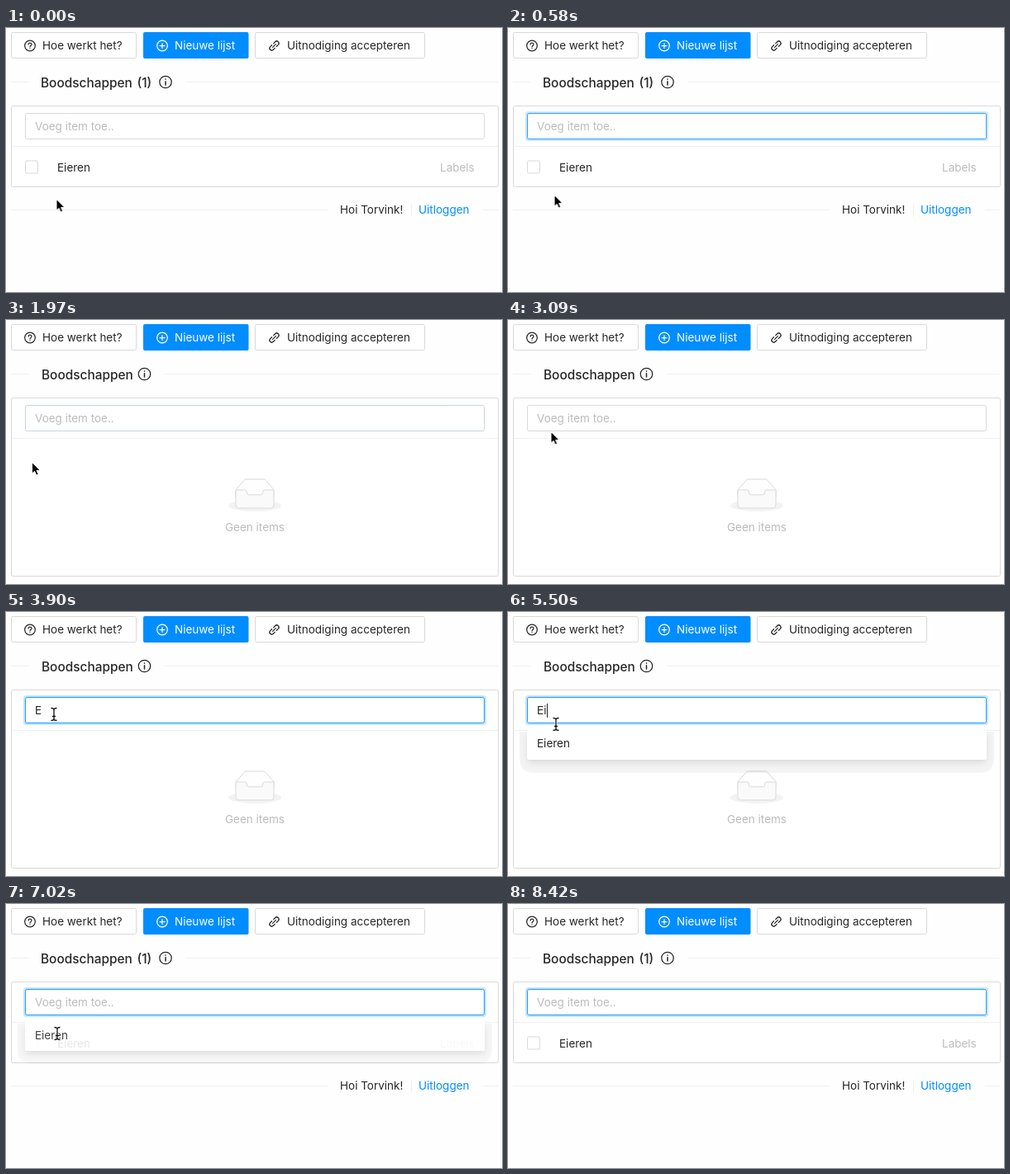
Animation of 600x320 px, one loop 9340 ms. Source, as an HTML page:

```html
<!DOCTYPE html>
<html lang="nl">
<head>
<meta charset="utf-8">
<title>Boodschappen</title>
<style>
html, body { margin: 0; width: 100%; height: 100%; overflow: hidden; background: #fefefe; }
svg { display: block; width: 600px; height: 320px; }
text { font: 13.5px Inter, "Open Sans", sans-serif; fill: #262626; }
.title { font-size: 15.4px; font-weight: 500; }
.muted { fill: #bcbcbc; }
.blue { fill: #008dff; }
.white { fill: #fff; }
.box { fill: #fff; stroke: #d9d9d9; }
.rule { fill: none; stroke: #f0f0f0; }
.icon { fill: none; stroke: #262626; stroke-width: 1.25; stroke-linecap: round; }
.icon.white { stroke: #fff; }

/* Hard switches, all on one 9340 ms loop */
.switch { animation: 9340ms step-end infinite; }
#list { animation-name: list; }
#empty { animation-name: empty; }
#hint { animation-name: hint; }
#typed { animation-name: typed; }
#second { animation-name: second; }
#caret { animation-name: caret; }
#hover, #hand { animation-name: hand; }
#arrow { animation-name: arrow; }
#beam { animation-name: beam; }
@keyframes list { 0%, 73.4% { visibility: visible } 19.27% { visibility: hidden } }
@keyframes empty { 0%, 73.4% { visibility: hidden } 19.27% { visibility: visible } }
@keyframes hint { 0%, 73.4% { visibility: visible } 41.11% { visibility: hidden } }
@keyframes typed { 0%, 73.4% { visibility: hidden } 41.11% { visibility: visible } }
@keyframes second { 0%, 73.4% { visibility: hidden } 46.25% { visibility: visible } }
@keyframes caret {
  0%, 53.85%, 65.74% { visibility: hidden }
  46.25%, 58.89% { visibility: visible }
}
@keyframes hand { 0%, 19.27% { visibility: hidden } 11.8% { visibility: visible } }
@keyframes arrow {
  0%, 19.27%, 60%, 84.1% { visibility: visible }
  11.8%, 33.5%, 73.77%, 90.15% { visibility: hidden }
}
@keyframes beam {
  0%, 60%, 84.1% { visibility: hidden }
  33.5%, 73.77% { visibility: visible }
}

#focus { animation: focus 9340ms ease-out infinite; }
@keyframes focus {
  0%, 3.75%, 21.73%, 35.33% { opacity: 0 }
  6.96%, 18.63%, 38.54%, 100% { opacity: 1 }
}

#menu { transform-origin: 23px 139px; animation: menu 9340ms linear infinite; }
@keyframes menu {
  0%, 46.25% { opacity: 0; transform: scaleY(.8); animation-timing-function: cubic-bezier(.23, 1, .32, 1) }
  48.5%, 73.77% { opacity: 1; transform: none; animation-timing-function: cubic-bezier(.755, .05, .855, .06) }
  75.91%, 100% { opacity: 0; transform: scaleY(.8) }
}

#pointer { animation: move 9340ms linear infinite; }
@keyframes move {
  0%, 1.17% { transform: translate(60.5px, 207px) }
  1.18%, 3.75% { transform: translate(60px, 207.5px); animation-timing-function: ease-in-out }
  12.96%, 14.12% { transform: translate(30px, 171px) }
  14.13%, 30.73% { transform: translate(31px, 172px) }
  33.08%, 33.7% { transform: translate(51.5px, 135px) }
  38%, 58.88% { transform: translate(58px, 124px) }
  58.89%, 59.5% { transform: translate(58px, 136px) }
  61.35%, 80.19% { transform: translate(62px, 157px) }
  80.84%, 83.4% { transform: translate(65px, 158px); animation-timing-function: ease-in }
  90.15%, 100% { transform: translate(487px, 324px) }
}
</style>
</head>
<body>
<svg viewBox="0 0 600 320">
  <defs>
    <filter id="blur" x="-10%" y="-60%" width="120%" height="220%"><feGaussianBlur stdDeviation="4"/></filter>
    <g id="info" class="icon">
      <circle r="7.2"/>
      <path d="M0-.8V3.6M0-3.6V-3.3" stroke-width="1.5"/>
    </g>
  </defs>

  <!-- Buttons -->
  <rect class="box" x="6.5" y="5.5" width="151" height="31" rx="2"/>
  <g class="icon" transform="translate(29 21.5)">
    <circle r="6.3"/>
    <path d="M-1.9-1.4C-1.9-4 1.9-4 1.9-1.5 1.9-.1 0 0 0 1.4M0 3.3V3.4"/>
  </g>
  <text x="44" y="26.3">Hoe werkt het?</text>
  <rect class="blue" x="166" y="5" width="127.5" height="32" rx="2"/>
  <g class="icon white" transform="translate(189 21.5)" style="fill: none">
    <circle r="6.3"/>
    <path d="M-3 0H3M0-3V3"/>
  </g>
  <text class="white" x="204" y="26.3">Nieuwe lijst</text>
  <rect class="box" x="301.5" y="5.5" width="205" height="31" rx="2"/>
  <g class="icon" transform="translate(324.5 21.5) rotate(-45)">
    <path d="M-1.5-2.6H-4.2A2.6 2.6 0 0 0-4.2 2.6H-1.5M1.5-2.6H4.2A2.6 2.6 0 0 1 4.2 2.6H1.5M-2.6 0H2.6"/>
  </g>
  <text x="340" y="26.3">Uitnodiging accepteren</text>

  <!-- List with one item -->
  <g id="list" class="switch">
    <path class="rule" d="M6 65.5H27M217 65.5H596M6 220.5H390M577 220.5H596M490.5 214V228"/>
    <text class="title" x="42" y="71.5">Boodschappen</text>
    <text class="title" x="158.5" y="71.5">(1)</text>
    <use href="#info" x="193" y="65.5"/>
    <rect class="box" x="6.5" y="94.5" width="589" height="98" rx="2"/>
    <rect class="box" x="23.5" y="161" width="15" height="15" rx="1.5"/>
    <text x="62" y="173.5">Eieren</text>
    <text class="muted" x="525" y="173.5">Labels</text>
    <text x="404" y="225.3">Hoi Torvink!</text>
    <text class="blue" x="499" y="225.3">Uitloggen</text>
  </g>
  <rect id="hover" class="switch" x="23.5" y="161" width="15" height="15" rx="1.5" fill="none" stroke="#1890ff"/>

  <!-- Empty list -->
  <g id="empty" class="switch">
    <path class="rule" d="M6 65.5H28M192 65.5H596"/>
    <text class="title" x="43" y="71.5">Boodschappen</text>
    <use href="#info" x="167.5" y="65.5"/>
    <rect class="box" x="6.5" y="94.5" width="589" height="216" rx="2"/>
    <g transform="translate(269 193)" stroke="#d9d9d9">
      <ellipse cx="32" cy="32" rx="32" ry="7" fill="#f3f3f3" stroke="none"/>
      <path fill="#fefefe" d="M55 12.8 44.9 1.3Q44 0 42.9 0H21.1Q20 0 19.1 1.3L9 12.8V22H55Z"/>
      <path fill="#fafafa" d="M41.6 16Q41.6 13 43.8 13H55V31Q55 35 52 35H12Q9 35 9 31V13H20.2Q22.4 13 22.4 16 22.4 18.9 24.6 18.9H39.4Q41.6 18.9 41.6 16Z"/>
    </g>
    <text class="muted" x="301" y="256.3" text-anchor="middle">Geen items</text>
  </g>

  <!-- Input -->
  <path class="rule" d="M7 143.5H595"/>
  <rect class="box" x="23.5" y="103.5" width="555" height="31" rx="2"/>
  <g id="focus" fill="none">
    <rect x="22" y="102" width="558" height="34" rx="3" stroke="#1890ff" stroke-opacity=".25" stroke-width="2"/>
    <rect x="23.5" y="103.5" width="555" height="31" rx="2" stroke="#1f9dff"/>
  </g>
  <text id="hint" class="switch muted" x="35" y="124.4">Voeg item toe..</text>
  <text id="typed" class="switch" x="35" y="124.4">E<tspan id="second" class="switch">i</tspan></text>
  <path id="caret" class="switch" d="M47.5 111V128" stroke="#262626"/>

  <!-- Suggestions -->
  <g id="menu">
    <path d="M14 145H588V177Q588 195 570 195H32Q14 195 14 177Z" fill-opacity=".045"/>
    <rect x="24" y="148" width="554" height="34" fill-opacity=".12" filter="url(#blur)"/>
    <rect x="23" y="139" width="556" height="40" rx="2" fill="#fff"/>
    <text x="35" y="164.4">Eieren</text>
  </g>

  <!-- Pointer -->
  <g id="pointer" stroke-linejoin="round">
    <path id="arrow" class="switch" d="M.5 .5V14.2L3.6 11.3 5.7 16.2 8.2 15.1 6.1 10.4H10.4Z" stroke="#fff"/>
    <g id="beam" class="switch" fill="none">
      <path d="M-3.5-7.5Q0-7.5 0-5.5 0-7.5 3.5-7.5M0-6V6M-3.5 7.5Q0 7.5 0 5.5 0 7.5 3.5 7.5M-2 2.5H2" stroke="#fff" stroke-width="3"/>
      <path d="M-3.5-7.5Q0-7.5 0-5.5 0-7.5 3.5-7.5M0-6V6M-3.5 7.5Q0 7.5 0 5.5 0 7.5 3.5 7.5M-2 2.5H2" stroke="#111" stroke-width="1.3"/>
    </g>
    <g id="hand" class="switch" stroke="#111" stroke-width="1.2">
      <path fill="#fff" d="M-1.6 9.5V.9Q-1.6-.7-.3-.7 1 -.7 1.1 .9L1.5 5.2Q3.6 4 4.1 5.8 6 4.9 6.7 6.6 9 6 9.2 8.4 9.4 11.5 7.9 13.6V16.2H.1Q-.6 13.9-2.6 12L-4.7 9.1Q-5-7.5-3.6 7.5-2.4 7.6-1.6 9.5Z" style="d: path('M-1.6 9.5V.9Q-1.6 -.7 -.3 -.7 1 -.7 1.1 .9L1.5 5.2Q3.6 4 4.1 5.8 6 4.9 6.7 6.6 9 6 9.2 8.4 9.4 11.5 7.9 13.6V16.2H.1Q-.6 13.9 -2.6 12L-4.7 9.1Q-5 7.5 -3.6 7.5 -2.4 7.6 -1.6 9.5Z')"/>
      <path d="M1.5 10V13.5M3.8 10V13.5M6.1 10V13.5" stroke-width=".9"/>
    </g>
  </g>
</svg>
</body>
</html>
```
